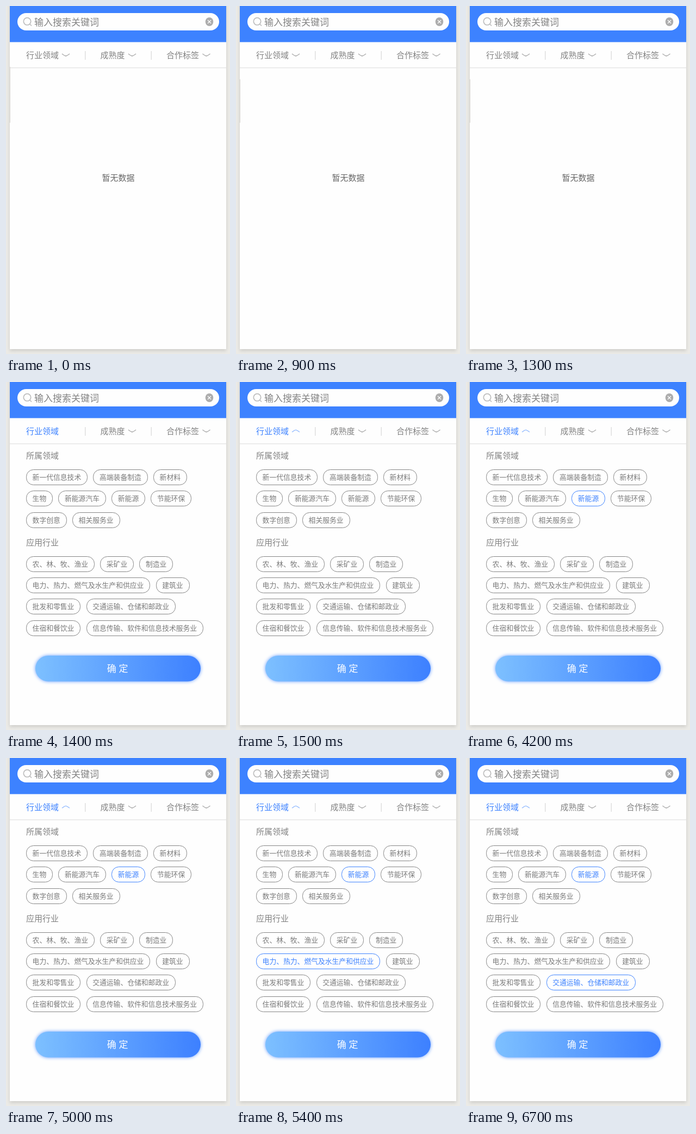
Recreate the animation shown at these times as an HTML page with a canvas. Size 412 px wide and 641 px high, loop 8 s.

```html
<!DOCTYPE html>
<html lang="zh-CN">
<head>
<meta charset="utf-8">
<style>
  html, body { margin: 0; width: 100%; height: 100%; overflow: hidden; background: #ebeae6; }
  canvas { display: block; width: 412px; height: 641px; }
</style>
</head>
<body>
<canvas id="stage" width="412" height="641"></canvas>
<script>
const ctx = document.getElementById('stage').getContext('2d');
const LOOP = 8000;
const BLUE = '#3d82ff';
const GREY = '#828282';
const FONT = '"Noto Sans CJK SC", "Noto Sans CJK", sans-serif';

// Each entry: [top edge, labels from left to right]
const CHIP_ROWS = [
  [161, '新一代信息技术', '高端装备制造', '新材料'],
  [200, '生物', '新能源汽车', '新能源', '节能环保'],
  [240, '数字创意', '相关服务业'],
  [321, '农、林、牧、渔业', '采矿业', '制造业'],
  [360, '电力、热力、燃气及水生产和供应业', '建筑业'],
  [399, '批发和零售业', '交通运输、仓储和邮政业'],
  [439, '住宿和餐饮业', '信息传输、软件和信息技术服务业']
];

// Selections: label, start, end
const PICKS = [
  ['新能源汽车', 3000, 4200],
  ['新能源', 4200, LOOP],
  ['电力、热力、燃气及水生产和供应业', 5400, 6700],
  ['交通运输、仓储和邮政业', 6700, LOOP]
];

function text(str, x, cy, size, color, weight = 300) {
  ctx.font = `${weight} ${size}px ${FONT}`;
  ctx.fillStyle = color;
  ctx.fillText(str, x, cy + size * 0.38);
}

function pill(x, y, w, h, r = h / 2) {
  ctx.beginPath();
  ctx.roundRect(x, y, w, h, r);
}

function stroke(color, width = 1) {
  ctx.strokeStyle = color;
  ctx.lineWidth = width;
  ctx.stroke();
}

function line(x1, y1, x2, y2, color, width) {
  ctx.beginPath();
  ctx.moveTo(x1, y1);
  ctx.lineTo(x2, y2);
  stroke(color, width);
}

function chevron(cx, cy, dir, color) {
  ctx.beginPath();
  ctx.moveTo(cx - 7, cy - 2 * dir);
  ctx.quadraticCurveTo(cx - 2, cy + 2 * dir, cx, cy + 2 * dir);
  ctx.quadraticCurveTo(cx + 2, cy + 2 * dir, cx + 7, cy - 2 * dir);
  stroke(color, 1.3);
}

function drawPage() {
  ctx.fillStyle = '#ebeae6';
  ctx.fillRect(0, 0, 412, 641);
  ctx.save();
  ctx.shadowColor = 'rgba(0,0,0,0.13)';
  ctx.shadowBlur = 6;
  ctx.shadowOffsetY = 3;
  ctx.fillStyle = '#fefefe';
  ctx.fillRect(7, -20, 398, 652);
  ctx.restore();
  ctx.fillStyle = BLUE;
  ctx.fillRect(7, 0, 398, 66.5);
}

function drawSearch() {
  pill(21, 13, 371, 32);
  ctx.fillStyle = '#fefefe';
  ctx.fill();
  ctx.beginPath();
  ctx.arc(39, 28.3, 6.7, 0, Math.PI * 2);
  stroke('#bdbdbd', 1.7);
  line(43.5, 33, 47, 36.5, '#bdbdbd', 1.7);
  text('输入搜索关键词', 52, 29.3, 17, GREY);

  ctx.beginPath();
  ctx.ellipse(374, 29, 7.3, 8, 0, 0, Math.PI * 2);
  ctx.fillStyle = '#adadad';
  ctx.fill();
  line(371, 26, 377, 32, '#fff', 1.3);
  line(377, 26, 371, 32, '#fff', 1.3);
}

function drawTabs(t, open) {
  text('行业领域', 37, 90.3, 15, open ? BLUE : GREY);
  text('成熟度', 173.5, 90.3, 15, GREY);
  text('合作标签', 295, 90.3, 15, GREY);
  if (!open) chevron(110, 90, 1, '#a6a6a6');
  else if (t >= 1500) chevron(110, 90.3, -1, '#94bbff');
  chevron(232, 90, 1, '#a6a6a6');
  chevron(368.5, 90, 1, '#a6a6a6');
  ctx.fillStyle = '#dedede';
  ctx.fillRect(145, 83, 1.5, 16);
  ctx.fillRect(266.5, 83, 1.5, 16);
  ctx.fillStyle = '#e6e6e6';
  ctx.fillRect(7, 113, 398, 1.5);
}

function drawChips(t) {
  const size = 12.8;
  const active = PICKS.filter(([, from, to]) => t >= from && t < to).map(p => p[0]);
  for (const [top, ...labels] of CHIP_ROWS) {
    let x = 37;
    for (const label of labels) {
      const w = label.length * size + 23.6;
      const on = active.includes(label);
      const left = Math.round(x);
      pill(left + 0.5, top + 0.5, Math.round(x + w) - left - 1, 28, 13);
      stroke(on ? BLUE : '#858585');
      text(label, x + 11.6, top + 14.5, size, on ? BLUE : '#7a7a7a');
      x += w + 10.2;
    }
  }
}

function drawButton() {
  const grad = ctx.createLinearGradient(54, 0, 358, 0);
  grad.addColorStop(0, '#7dc0ff');
  grad.addColorStop(1, '#3d80ff');
  ctx.save();
  ctx.shadowColor = 'rgba(61,130,255,0.8)';
  ctx.shadowBlur = 6;
  ctx.fillStyle = grad;
  pill(54, 504, 304, 47.5);
  ctx.fill();
  ctx.restore();
  text('确', 185.8, 527.5, 17, '#fff', 400);
  text('定', 207.4, 527.5, 17, '#fff', 400);
}

function render(t) {
  const open = t >= 1400;
  drawPage();
  drawSearch();
  drawTabs(t, open);
  if (open) {
    text('所属领域', 37, 135.5, 15, GREY);
    text('应用行业', 37, 295.5, 15, GREY);
    drawChips(t);
    drawButton();
  } else {
    text('暂无数据', 176.5, 316.3, 15, '#666');
    ctx.fillStyle = '#dcd8d6';
    const top = t < 900 ? 112 : 135;
    ctx.fillRect(7, top, 1, 215 - top);
  }
}

function tick() {
  render(performance.now() % LOOP);
  requestAnimationFrame(tick);
}
tick();
</script>
</body>
</html>
```
